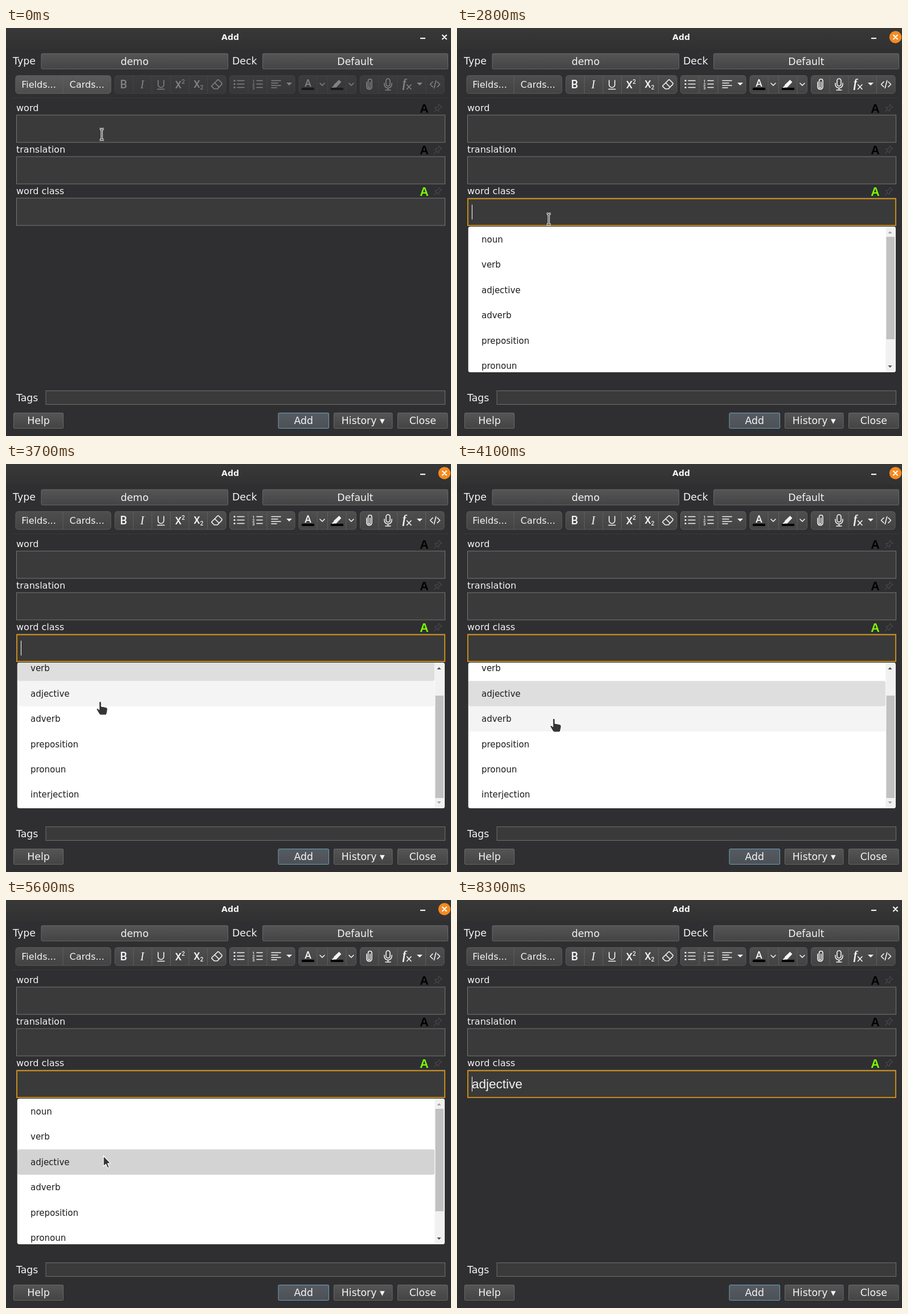
An HTML page for the animation above (8400 ms loop, 781 by 717 pixels).

```html
<!DOCTYPE html>
<html lang="en">
<head>
<meta charset="utf-8">
<title>Add</title>
<style>
  html, body { margin: 0; width: 100%; height: 100%; overflow: hidden; background: #2f2f31; }
  svg { display: block; }
  text { font-family: "DejaVu Sans", sans-serif; fill: #f4f4f4; white-space: pre; }
  .ui { font-size: 17.33px; }
  .label, .tool { font-size: 16px; }
  .item { font-size: 15px; fill: #1c1c1c; }
  .mid { text-anchor: middle; }
  .value { font: 22.5px "Liberation Sans", Arial, sans-serif; }
  .badge { font: bold 21.5px "Liberation Sans", Arial, sans-serif; }
  .glyph { font-family: Roboto, sans-serif; font-weight: 500; }
  .line { fill: none; stroke: #f4f4f4; stroke-width: 1.6; stroke-linecap: round; stroke-linejoin: round; }
</style>
</head>
<body>
<svg id="stage" width="781" height="717" viewBox="0 0 781 717"></svg>
<script>
const LOOP = 8400, STEP = 100;
const ROW = 44.4, LIST_TOP = 349.5;
const WORDS = ["noun", "verb", "adjective", "adverb", "preposition", "pronoun", "interjection"];
const FIELDS = [["word", 152.5, "#000"], ["translation", 225.5, "#000"], ["word class", 298.5, "#7cfc00"]];

// Each row: time, then values, joined linearly.
const POINTER = [
  [0, 168, 187], [100, 168, 187], [200, 165, 203], [300, 156, 236], [400, 151, 247],
  [1200, 151, 247], [1300, 152, 264], [1400, 157, 302], [1500, 160.5, 325],
  [2700, 160.5, 325], [2800, 161, 336], [2900, 162, 357], [3000, 162, 380], [3100, 163, 403],
  [3200, 163, 417], [3300, 164, 420], [3900, 166, 420], [4000, 168, 424], [4100, 170, 450],
  [4200, 171, 456], [4500, 168, 458], [4900, 165, 454], [5000, 165, 454], [5100, 171, 449.5],
  [5800, 171, 449.5], [5900, 172, 425], [6000, 175, 372], [6100, 177, 328], [6200, 176.5, 313],
  [6300, 176.5, 313], [6400, 177.5, 312], [7000, 177.5, 312], [7100, 177, 309],
  [7200, 176, 297], [7300, 174, 268], [7600, 169, 128], [7800, 167, 30], [7900, 167, -40]
];
const SCROLL = [[3400, 0], [3500, 20], [3600, 46], [3700, 57], [4200, 57], [4300, 46], [4400, 18], [4500, 0]];
const HOVER = [
  [[2900, 0], [3080, .7], [3280, 0]],
  [[3085, 0], [3285, 1], [3650, 1], [3850, 0]],
  [[3650, 0], [3850, 1], [4050, 1], [4250, 0], [4550, 0], [4750, 1]],
  [[4050, 0], [4250, 1], [4550, 1], [4750, 0]]
];
const TOOLS_FADE = [[600, .42], [700, .7], [800, 1]];

function at(table, t) {
  const next = table.findIndex(row => row[0] > t);
  if (next === 0) return table[0].slice(1);
  if (next < 0) return table[table.length - 1].slice(1);
  const a = table[next - 1], b = table[next], p = (t - a[0]) / (b[0] - a[0]);
  return a.slice(1).map((v, i) => v + (b[i + 1] - v) * p);
}

const text = (x, y, s, cls, extra = "") => `<text x="${x}" y="${y}" class="${cls}" ${extra}>${s}</text>`;
const rect = (x, y, w, h, fill, extra = "") =>
  `<rect x="${x}" y="${y}" width="${w}" height="${h}" fill="${fill}" ${extra}/>`;
const path = (d, extra = 'class="line"') => `<path d="${d}" ${extra}/>`;
const gradient = (id, top, bottom) =>
  `<linearGradient id="${id}" x2="0" y2="1"><stop stop-color="${top}"/><stop offset="1" stop-color="${bottom}"/></linearGradient>`;
const button = (x, y, w, h, s, fill = "btn", edge = "#686868") =>
  rect(x, y, w, h, `url(#${fill})`, `stroke="${edge}" rx="1.5"`) + text(x + w / 2, y + h / 2 + 6, s, "ui mid");

// Toolbar strip: rounded outline with inner dividers at the given edges.
function strip(edges, fill = "tool") {
  const x = edges[0], w = edges[edges.length - 1] - x;
  return rect(x, 83.5, w, 31.5, `url(#${fill})`, 'rx="4.5" stroke="#5c5c5c"') +
    edges.slice(1, -1).map(e => path(`M${e} 84V115`, 'stroke="#5f5f5f"')).join("");
}
const glyph = (x, y, s, size, extra = "") => text(x, y, s, "glyph mid", `style="font-size:${size}px" ${extra}`);
const chevron = x => path(`M${x - 4} 97l4 4 4-4`);
const caretDown = x => path(`M${x - 5} 96h10l-5 5z`, 'fill="#f4f4f4"');

function icons() {
  const rows = [92.5, 98.5, 104.5];
  return glyph(206.5, 106, "B", 19.5, 'font-weight="700" style="font-weight:700;font-size:19.5px"') +
    text(239, 106, "I", "mid", 'style="font:italic 20px \'Liberation Serif\',serif"') +
    path("M267 92V99.5a5 5 0 0 0 10 0V92M266 107.5H278") +
    glyph(302.5, 106, "X", 18) + glyph(311, 98, "2", 10) +
    glyph(335, 105, "X", 18) + glyph(343.5, 108, "2", 10) +
    path("M361 101.5L371 91.5a2 2 0 0 1 2.6 0L378.6 96.5a2 2 0 0 1 0 2.6L371 107h-5.5L361 102.6zM366.5 96.5l7.5 7.5") +
    rows.map((y, i) => `<circle cx="401" cy="${y}" r="1.6" fill="#f4f4f4"/>` +
      path(`M406 ${y}H418M440 ${y}H450`) + glyph(434.5, y + 3, i + 1, 7.5)).join("") +
    path("M466 92.5H482M466 96.8H477M466 101H482M466 105H475") + caretDown(497) +
    glyph(530, 102.5, "A", 18) + rect(519, 105, 22, 4, "#000") + chevron(555) +
    path("M575.5 100l9-8.5 3.5 3.5-8.5 9h-4z", 'fill="#f4f4f4" stroke="#f4f4f4"') +
    path("M574.5 101.5l-3 3.5h4z", 'fill="#f4f4f4"') + rect(570, 105, 22, 4, "#000") + chevron(606) +
    path("M633 95v9a4.6 4.6 0 0 0 9 0V93a3.2 3.2 0 0 0-6.4 0v10.5a1.6 1.6 0 0 0 3.4 0V95") +
    path("M667 92.5a3.5 3.5 0 0 1 7 0v6a3.5 3.5 0 0 1-7 0zM664 97v2a6.5 6.5 0 0 0 13 0v-2M670.5 105.5V109M666 109H675") +
    text(699, 104, "f", "mid", 'style="font:italic bold 20px \'Liberation Serif\',serif"') +
    path("M703.5 99.5l7.5 8M711 99.5l-7.5 8") + caretDown(726) +
    path("M749 94.5l-4.5 4.5 4.5 4.5M757 94.5l4.5 4.5-4.5 4.5M754.7 92.5l-3.4 13");
}

function fieldRow([name, y, tint]) {
  const pin = "M9.8 1.2L14.8 6.2Q13.8 7 12.6 6.6L9.4 9.8Q10 12 8.8 13.4L2.6 7.2Q4 6 6.2 6.6L9.4 3.4Q9 2.2 9.8 1.2ZM5.7 10.3L1.2 14.8";
  return text(18, y - 6.5, name, "label") +
    text(734, y - 3.5, "A", "badge mid", `style="fill:${tint}"`) +
    path(pin, `transform="translate(750 ${y - 19.5})" fill="none" stroke="#555557"`) +
    rect(18.5, y + .5, 752, 48, "#3a3a3a", 'stroke="#777"');
}

const arrowHead = (id, y, dir) => `<path id="${id}" d="M756.5 ${y + 2 * dir}h7l-3.5 ${-4 * dir}z"/>`;

function dropdown() {
  const rows = WORDS.map((word, i) => {
    const y = LIST_TOP + i * ROW;
    return rect(20, y, 732, ROW, "#d3d3d3", `rx="3" id="hover${i}" opacity="0"`) + text(43, y + 27.4, word, "item");
  }).join("");
  return `<g id="list"><g clip-path="url(#listClip)">${rect(19.5, 349, 750.5, 256, "#fff")}<g id="rows">${rows}</g>` +
    rect(752.5, 349, 17.5, 256, "#f1f1f1") + rect(753.5, 367, 14.5, 180, "#c1c1c1", 'id="thumb"') +
    arrowHead("up", 359, 1) + arrowHead("down", 595, -1) + "</g></g>";
}

function pointers() {
  const beam = "M-3.5-9.5H-1.5Q0-9.5 0-8Q0-9.5 1.5-9.5H3.5M0-8V8M-3.5 9.5H-1.5Q0 9.5 0 8Q0 9.5 1.5 9.5H3.5";
  const hand = "M5 2Q5 .2 7 .2Q9 .2 9 3V9L17 10.5Q20 11 20 14L18.5 22Q18 24 16 24H8Q6 24 5 22L.8 15Q0 13 1.5 12.4Q3 12 5.2 14.5Z";
  const outline = 'fill="#353535" stroke="#fff" stroke-width="1.2" stroke-linejoin="round"';
  return `<g id="pointer"><g id="beam" fill="none">${path(beam, 'stroke="#fff" stroke-width="3.4"')}` +
    `${path(beam, 'stroke="#222" stroke-width="1.2"')}</g>` +
    path(hand, `id="hand" transform="translate(-7 -3)" ${outline}`) +
    path("M0 0V18.5L4.3 14.8L7.3 21.5L10.2 20.2L7.3 13.6L12.5 13Z", `id="arrow" ${outline}`) + "</g>";
}

const stage = document.getElementById("stage");
stage.innerHTML = "<defs>" +
  gradient("bar", "#383838", "#313131") + gradient("btn", "#555", "#444") +
  gradient("main", "#565b61", "#4b5157") + gradient("tool", "#4e4e4e", "#434343") +
  gradient("idle", "#5b5b5b", "#4e4e4e") +
  '<clipPath id="listClip"><rect x="19.5" y="349" width="750.5" height="256" rx="4"/></clipPath></defs>' +
  rect(0, 0, 781, 717, "#2f2f31") + rect(0, 0, 781, 37, "url(#bar)") +
  text(393.5, 21, "Add", "mid", 'font-size="14" font-weight="700"') +
  rect(727, 17, 9, 2.2, "#f4f4f4") +
  '<circle id="closeDisc" cx="769.5" cy="16" r="10.7" fill="#f58a20"/>' +
  path("M766 12.5l7 7M773 12.5l-7 7", 'stroke="#fff" stroke-width="2.1" stroke-linecap="round"') +
  text(12, 64, "Type", "ui") + button(62, 45, 327.5, 27, "demo") +
  text(397, 64, "Deck", "ui") + button(450.5, 45, 325, 27, "Default") +
  strip([17, 100, 184]) + `<g id="idle">${strip([17, 100, 184], "idle")}</g>` +
  text(57.5, 105, "Fields...", "tool mid") + text(142, 105, "Cards...", "tool mid") +
  '<g id="tools">' + strip([191, 223.5, 256, 288.5, 321, 353.5, 386]) + strip([392.5, 425, 458, 507]) +
  strip([514, 546, 564.5, 597, 614.5]) + strip([621.5, 654, 687, 736.5, 769]) + icons() + "</g>" +
  path("M12 123H775", 'stroke="#3b3b3d"') +
  FIELDS.map(fieldRow).join("") +
  rect(19, 0, 751, 47, "none", 'id="focus" stroke="#c68b18" stroke-width="2"') +
  text(26, 331, "adjective", "value", 'id="value"') +
  rect(26, 0, 1, 26, "#fff", 'id="caret"') +
  text(18, 656, "Tags", "ui") + rect(70, 637.5, 700.5, 24, "#3a3a3a", 'stroke="#6f6f6f"') +
  button(13.5, 676.5, 87, 27, "Help") + button(478, 676.5, 88.5, 27, "Add", "main", "#6e9fbe") +
  button(575.5, 676.5, 102.5, 27, "History ▾") + button(687.5, 676.5, 87.5, 27, "Close") +
  dropdown() + pointers();

const el = Object.fromEntries([...stage.querySelectorAll("[id]")].map(node => [node.id, node]));
const show = (node, on) => node.setAttribute("visibility", on ? "visible" : "hidden");
const set = (node, name, value) => node.setAttribute(name, value);

function render(t) {
  const typing = t >= 700, last = t >= 2300;
  show(el.closeDisc, typing && t < 8200);
  show(el.idle, !typing);
  set(el.tools, "opacity", at(TOOLS_FADE, t)[0]);

  show(el.focus, typing);
  set(el.focus, "y", last ? 300 : 227);
  const blinkOn = Math.floor((t - (last ? 2300 : 700)) / 600) % 2 === 0;
  show(el.caret, typing && blinkOn);
  set(el.caret, "y", last ? 310.5 : 237);
  show(el.value, t >= 5700);

  const scroll = at(SCROLL, t)[0];
  set(el.list, "display", last && t < 5700 ? "inline" : "none");
  set(el.rows, "transform", `translate(0 ${-scroll})`);
  set(el.thumb, "y", 367 + scroll * 40 / 57);
  set(el.up, "fill", scroll > 0 ? "#505050" : "#a3a3a3");
  set(el.down, "fill", scroll < 57 ? "#505050" : "#a3a3a3");
  HOVER.forEach((table, i) => set(el["hover" + i], "opacity", at(table, t)[0]));

  const [x, y] = at(POINTER, t);
  const kind = t >= 2900 && t < 5600 ? "hand" : y > 348 || y < 130 ? "arrow" : "beam";
  set(el.pointer, "transform", `translate(${x} ${y})`);
  for (const name of ["beam", "hand", "arrow"]) show(el[name], name === kind);
}

const start = performance.now();
function tick() {
  const t = (performance.now() - start) % LOOP;
  render(Math.floor(t / STEP) * STEP);
  requestAnimationFrame(tick);
}
tick();
</script>
</body>
</html>
```
